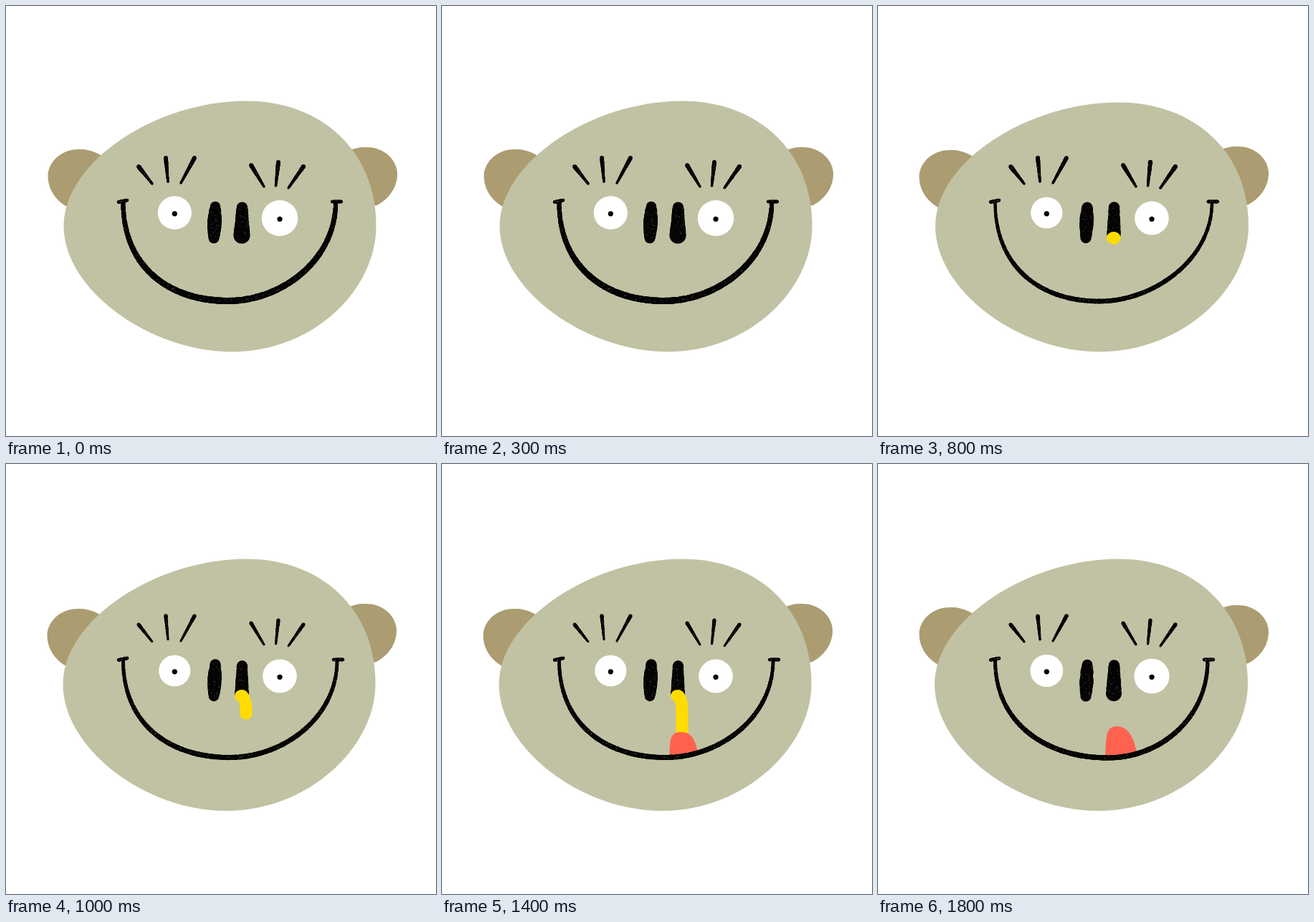
An HTML page with a canvas for the animation above (1900 ms loop, 600 px wide and 600 px high).

```html
<!DOCTYPE html>
<html lang="en">
<head>
<meta charset="utf-8">
<title>Runny nose</title>
<style>
  html, body { margin: 0; height: 100%; overflow: hidden; background: #fff; }
  canvas { display: block; }
</style>
</head>
<body>
<canvas id="stage" width="600" height="600"></canvas>
<script>
const ctx = document.getElementById('stage').getContext('2d');
const STEP = 100, FRAMES = 19;
const INK = '#050505', SKIN = '#c1c2a3', EAR = '#ab9d71', SNOT = '#ffdc00', TONGUE = '#ff6350';

// Redrawn faces that make the line boil.
// head: left, top, right, bottom; chin: lowest head x; low: lowest mouth point; end: right mouth x
const POSES = {
  A: { head: [80.5, 132.5, 516.5, 482.5], chin: 315, ear: 0, eye: 0, lash: 5, ink: 8.8, nostril: 22, low: [310, 411.5], end: 460 },
  B: { head: [80, 134.5, 517, 482.5], chin: 309, ear: 1, eye: 1.5, lash: 5, ink: 6.3, nostril: 19, low: [309, 412], end: 466 },
  C: { head: [80.5, 134, 515.5, 482], chin: 305, ear: 0, eye: 1.2, lash: 4, ink: 5.6, nostril: 19, low: [310, 412], end: 462 },
  D: { head: [79.5, 132.5, 515.5, 484], chin: 307, ear: 2, eye: 1.5, lash: 4.3, ink: 6.8, nostril: 19, low: [312, 409.5], end: 462 },
  E: { head: [79, 132.5, 516, 484], chin: 307, ear: 0, eye: .7, lash: 4.5, ink: 7, nostril: 21, low: [320, 410], end: 460 }
};
const ORDER = 'AEDAEDAEBCDBCBDEBDE';
const LASHES = [
  [185, 224, 204, 248], [223, 212, 226, 245], [263, 212, 244, 247],
  [342, 222, 360, 252], [380, 218, 376.5, 251], [415, 224, 394, 254]
];

let seed;
const random = () => (seed = seed * 16807 % 2147483647) / 2147483647;

function oval(x, y, rx, ry, color) {
  ctx.fillStyle = color;
  ctx.beginPath();
  ctx.ellipse(x, y, rx, ry, 0, 0, 2 * Math.PI);
  ctx.fill();
}

const line = (x1, y1, x2, y2) => t => [x1 + (x2 - x1) * t, y1 + (y2 - y1) * t];

const bezier = (...p) => t => [0, 1].map(k =>
  (1 - t) ** 3 * p[k] + 3 * t * (1 - t) ** 2 * p[k + 2] + 3 * t * t * (1 - t) * p[k + 4] + t ** 3 * p[k + 6]);

// Rough line with light specks; path and width depend on progress 0..1.
function crayon(path, width, steps = 40) {
  const specks = [];
  for (let i = 0; i <= steps; i++) {
    const t = i / steps, [x, y] = path(t), w = width(t), r = w / 2 * (.9 + .16 * random());
    oval(x, y, r, r, INK);
    if (random() < w * .025) specks.push([x + (random() - .5) * w * .9, y + (random() - .5) * 3]);
  }
  for (const [x, y] of specks) oval(x, y, .6, .5, 'rgba(193,194,163,.5)');
}

function drawEar(side, dx, dy) {
  ctx.save();
  ctx.translate(side < 0 ? 58.5 + dx : 546 + dx, 237 + dy - (side > 0 ? 3 : 0));
  ctx.scale(-side, 1);
  ctx.fillStyle = EAR;
  ctx.beginPath();
  ctx.moveTo(0, 0);
  ctx.bezierCurveTo(0, -18, 17, -37, 43, -37);
  ctx.bezierCurveTo(60, -38, 74, -30, 90, -18);
  ctx.lineTo(60, 50);
  ctx.lineTo(28, 44);
  ctx.bezierCurveTo(10, 34, 0, 18, 0, 0);
  ctx.fill();
  ctx.restore();
}

function drawHead([left, top, right, bottom], chin) {
  const crown = 335, mid = 307;
  ctx.fillStyle = SKIN;
  ctx.beginPath();
  ctx.moveTo(left, mid);
  ctx.bezierCurveTo(left, mid - 90, crown - 125, top, crown, top);
  ctx.bezierCurveTo(crown + 105, top, right, mid - 105, right, mid);
  ctx.bezierCurveTo(right, mid + 88, chin + 115, bottom, chin, bottom);
  ctx.bezierCurveTo(chin - 113, bottom, left, mid + 90, left, mid);
  ctx.fill();
}

function drawEye(x, y, r) {
  oval(x, y, r, r - .3, '#fff');
  oval(x, y + 1.3, 3.6, 3.6, INK);
}

function drawDrip(length) {
  oval(328.8, 323.5, 9.8, 8.4, SNOT);
  ctx.strokeStyle = SNOT;
  ctx.lineWidth = 17;
  ctx.lineCap = 'round';
  ctx.setLineDash([length, 999]);
  ctx.beginPath();
  ctx.moveTo(329, 324);
  ctx.quadraticCurveTo(335, 326, 335, 345);
  ctx.lineTo(335, 400);
  ctx.stroke();
}

function drawTongue(top) {
  const h = 408 - top, right = Math.min(361, 340 + h / 2);
  ctx.fillStyle = TONGUE;
  ctx.beginPath();
  ctx.moveTo(317, 408);
  ctx.bezierCurveTo(319, 408 - h * .55, 316, top, 333, top);
  ctx.bezierCurveTo(350, top, right - 4, 402 - h * .45, right, 402);
  ctx.fill();
}

function drawMouth({ low: [x, y], end, ink }) {
  const start = 163.5, top = 274;
  const left = bezier(start, top, start, top + 88, x - 85, y, x, y);
  const right = bezier(x, y, x + 75, y, end, top + 80, end, top);
  crayon(t => t < .5 ? left(2 * t) : right(2 * t - 1),
    t => ink * (.7 + .34 * Math.sin(Math.PI * t)), 420);
  crayon(line(157, 273.5, 169, 271), () => 4.6);
  crayon(line(end - 5, 273, end + 8, 273), () => 4.6);
}

function draw(frame) {
  const key = ORDER[frame], pose = POSES[key];
  seed = key.charCodeAt(0) * 7919;
  ctx.clearRect(0, 0, 600, 600);

  const inset = key === 'A' ? 0 : -1;
  drawEar(-1, inset, pose.ear);
  drawEar(1, inset, -pose.ear);
  drawHead(pose.head, pose.chin);

  drawEye(235.3, 288.5, 23.6 - pose.eye);
  drawEye(382, 296, 25.3 - pose.eye);
  for (const lash of LASHES) crayon(line(...lash), t => pose.lash * (1.2 - .5 * t));
  crayon(line(292, 280, 290, 324), t => 14.5 + 4.5 * Math.sin(Math.PI * t));
  crayon(line(329.5, 281, 329, 320), t => 15 + (pose.nostril - 15) * t);

  // The drip runs down, then the tongue climbs to lick it off and sinks back.
  if (frame >= 8 && frame < 16) drawDrip(Math.min(52, .1 + (frame - 8) * 13));
  if (frame >= 13) drawTongue(322 + (frame < 16 ? 26 * (16 - frame) : 22 * (frame - 16)));
  drawMouth(pose);
}

let shown = -1;
const start = performance.now();
function loop() {
  const frame = Math.floor((performance.now() - start) / STEP) % FRAMES;
  if (frame !== shown) draw(shown = frame);
  requestAnimationFrame(loop);
}
loop();
</script>
</body>
</html>
```
